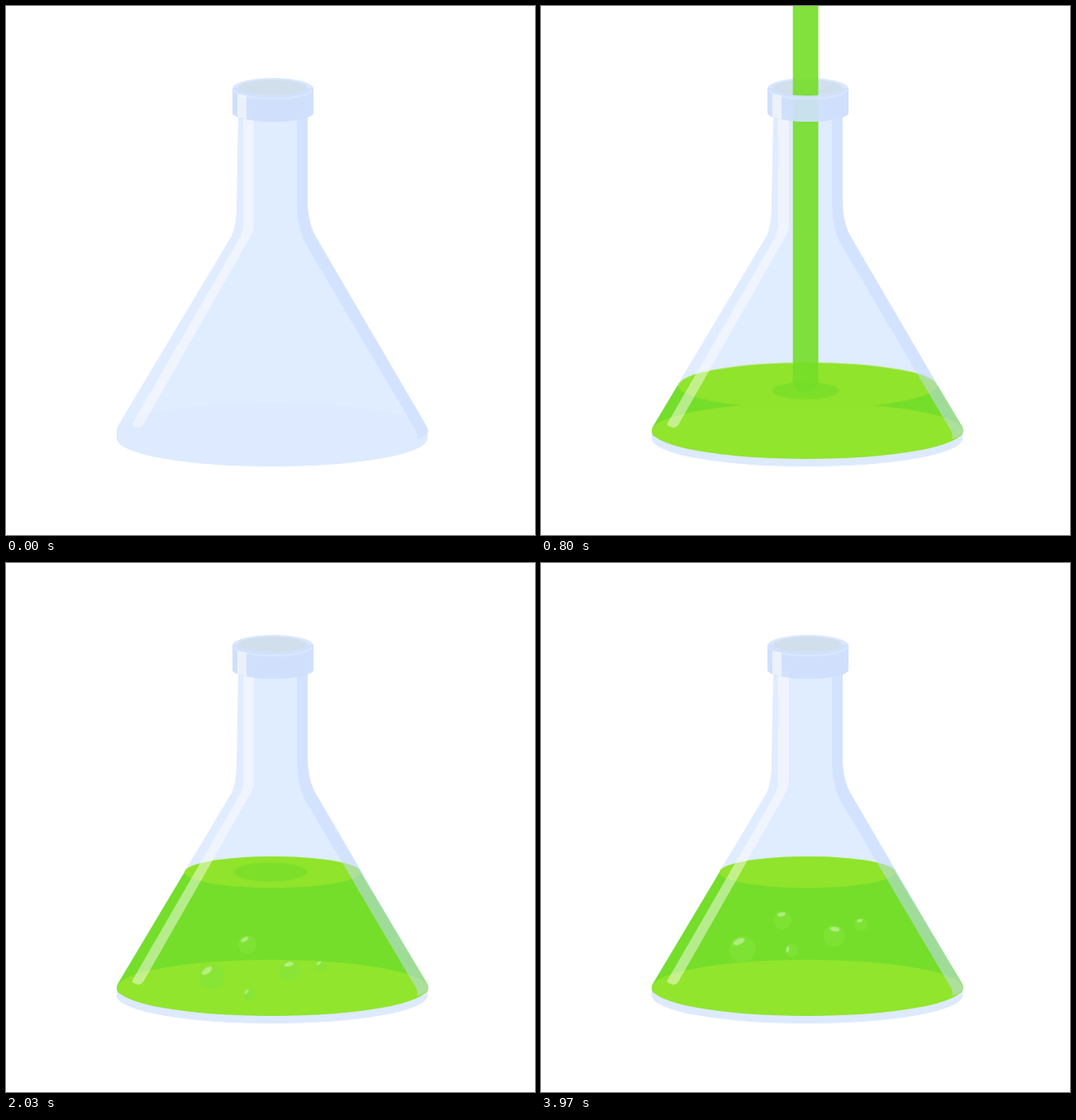
Write an HTML page that moves like this. It is 640 by 640 pixels and loops after 4010 ms.

```html
<!DOCTYPE html>
<html lang="en">
<head>
<meta charset="utf-8">
<title>Filling flask</title>
<style>
html, body { margin: 0; width: 100%; height: 100%; overflow: hidden; background: #fff; }
svg { display: block; width: 100vw; height: 100vh; }

.spread, .fill, .surface, .level, .ripples, .ripple, .stream, .bubble {
  animation: 4010ms linear infinite both;
}

/* liquid */
.spread { animation-name: spread; transform-origin: 322px 522px; }
.fill { animation-name: fill; }
.surface { animation-name: surface; }
.level { animation-name: level; }
.ripples { animation-name: calm; }
.ripple { animation-name: ripple; }
.ripple:nth-child(2) { animation-delay: 590ms; }
.ripple:nth-child(3) { animation-delay: 1180ms; }
.stream { animation-name: pour; }

@keyframes spread {
  0%, 14.71% { transform: scale(0); }
  16.96%, 100% { transform: scale(1); }
}
@keyframes fill {
  0%, 14.96% { transform: translateY(514px); animation-timing-function: cubic-bezier(.39, .575, .565, 1); }
  34.64%, 100% { transform: translateY(374px); }
}
@keyframes surface {
  0%, 14.96% { transform: translate(322.5px, 514px) scale(188.4, 33.5); animation-timing-function: cubic-bezier(.39, .575, .565, 1); }
  34.64%, 100% { transform: translate(322.5px, 374px) scale(106.5, 19); }
}
@keyframes level {
  0%, 14.96% { transform: translate(320px, 524px); animation-timing-function: cubic-bezier(.39, .575, .565, 1); }
  34.64%, 100% { transform: translate(320px, 374px); }
}
@keyframes calm {
  0%, 50.9% { opacity: 1; }
  52.6%, 100% { opacity: 0; }
}
@keyframes ripple {
  0%, 9.98% { transform: scale(0); opacity: .9; }
  13.2% { transform: scale(.55); }
  14.21% { transform: scale(.58); }
  19.95% { transform: scale(1); opacity: .9; }
  28.18% { transform: scale(1.7); opacity: .4; }
  29.93%, 100% { transform: scale(1.85); opacity: 0; }
}
@keyframes pour {
  0%, 1.25% { transform: translateY(-530px) scaleY(1); }
  10.22%, 28.4% { transform: translateY(0) scaleY(1); }
  28.68% { transform: translateY(0) scaleY(.7); }
  38.9%, 100% { transform: translateY(0) scaleY(0); }
}

/* bubbles */
.b1 { animation-name: b1; }
.b2 { animation-name: b2; }
.b3 { animation-name: b3; }
.b4 { animation-name: b4; }
.b5 { animation-name: b5; }

@keyframes b1 {
  0%, 22.44% { transform: translate(292px, 474px) rotate(-38deg) scale(0); }
  28.18% { transform: translate(292px, 471px) rotate(-35deg) scale(11); }
  50.62% { transform: translate(292px, 461.5px) rotate(-28deg) scale(11); }
  79.05% { transform: translate(292px, 442px) rotate(-14deg) scale(11); }
  100% { transform: translate(292px, 431.5px) rotate(-9deg) scale(11); }
}
@keyframes b2 {
  0%, 31.17% { transform: translate(250px, 514px) rotate(-45deg) scale(0); }
  50.62% { transform: translate(249px, 501px) rotate(-37deg) scale(15.5); }
  79.05% { transform: translate(245px, 480px) rotate(-27deg) scale(16); }
  100% { transform: translate(243.5px, 466.5px) rotate(-24deg) scale(16); }
}
@keyframes b3 {
  0%, 24.94% { transform: translate(340.5px, 508px) rotate(-48deg) scale(0); }
  28.18% { transform: translate(341px, 506px) rotate(-45deg) scale(6); }
  50.62% { transform: translate(344px, 493px) rotate(-14deg) scale(12.5); }
  79.05% { transform: translate(352px, 462.5px) rotate(2deg) scale(13); }
  100% { transform: translate(354.5px, 450.5px) rotate(8deg) scale(13); }
}
@keyframes b4 {
  0%, 31.17% { transform: translate(379px, 506px) rotate(-46deg) scale(0); }
  50.62% { transform: translate(381px, 488px) rotate(-37deg) scale(7.5); }
  79.05% { transform: translate(384px, 460px) rotate(-22deg) scale(8); }
  100% { transform: translate(387px, 436.5px) rotate(-14deg) scale(8); }
}
@keyframes b5 {
  0%, 34.91% { transform: translate(292.5px, 527px) rotate(-46deg) scale(0); }
  50.62% { transform: translate(294.5px, 521.5px) rotate(-50deg) scale(7.5); }
  79.05% { transform: translate(300px, 491px) rotate(-66deg) scale(8); }
  100% { transform: translate(303.5px, 467.5px) rotate(-78deg) scale(8); }
}
</style>
</head>
<body>
<svg viewBox="0 0 640 640">
  <defs>
    <clipPath id="cone">
      <path d="M216 374L136 508Q132 514 136 520L322 548L508 520Q513 514 509 508L429 374Z"/>
    </clipPath>
    <path id="band" d="M274 99V129A49 11 0 0 0 372 129V99H364A41.5 9.5 0 0 1 281 99Z"/>
    <g id="bubble">
      <circle r="1" fill="#84e53a" opacity=".6"/>
      <ellipse cy="-.63" rx=".46" ry=".22" fill="#fff" opacity=".38"/>
    </g>
  </defs>

  <!-- glass -->
  <ellipse cx="322" cy="523" rx="188" ry="34" fill="#ddeaff"/>
  <path fill="#e0ecff" d="M281 130L279 240Q279 265 273 278L136 507Q132 514 135 519A188 34 0 0 0 509 519Q513 514 508 507L373 276Q365 260 365 240V130Z"/>
  <path fill="#ddeaff" d="M134 514A188 34 0 0 1 510 514L510 523A188 34 0 0 1 134 523Z"/>

  <!-- rim -->
  <ellipse cx="323" cy="100" rx="49" ry="13" fill="#dae7ff"/>
  <ellipse cx="322.5" cy="98.5" rx="41.5" ry="9.5" fill="#d1dfed"/>
  <use href="#band" fill="#d0e0fc"/>

  <!-- liquid -->
  <g class="spread">
    <g clip-path="url(#cone)">
      <rect class="fill" x="120" width="400" height="300" fill="#75de2a"/>
    </g>
    <ellipse cx="322" cy="514" rx="188" ry="34" fill="#91e52c"/>
    <use href="#bubble" class="bubble b1"/>
    <use href="#bubble" class="bubble b2"/>
    <use href="#bubble" class="bubble b3"/>
    <use href="#bubble" class="bubble b4"/>
    <use href="#bubble" class="bubble b5"/>
    <ellipse class="surface" rx="1" ry="1" fill="#90e42b"/>
  </g>

  <g class="level">
    <g class="ripples">
      <ellipse class="ripple" rx="40" ry="10.4" fill="#7bde2b"/>
      <ellipse class="ripple" rx="40" ry="10.4" fill="#7bde2b"/>
      <ellipse class="ripple" rx="40" ry="10.4" fill="#7bde2b"/>
    </g>
    <path class="stream" fill="#75de28" opacity=".9" d="M-15.3 -560H15.5V-10Q14 2 0 3Q-14 2 -15.3 -10Z"/>
  </g>

  <!-- shade and shine -->
  <path fill="#c7dbff" opacity=".52" d="M352 130H365V240Q366 260 373 276L508 507Q513 514 508 519Q504 522 497 524Q499 520 496 514L361 285Q352 265 352 240Z"/>
  <path fill="#fefdfa" opacity=".47" d="M287 130H300V264Q300 271 297 277L166 507Q163 511 159 510L154 508Q151 507 154 503L283 280Q287 272 287 264Z"/>

  <!-- rim front -->
  <use href="#band" fill="#d0e0fc" opacity=".92"/>
  <path fill="none" stroke="#dae7ff" stroke-width="2.4" opacity=".85" d="M276 101A47 11 0 0 0 370 101"/>
  <path fill="#fefdfa" opacity=".6" d="M280 106.500L291 108.500V137L280 134.500Z"/>
</svg>
</body>
</html>
```
